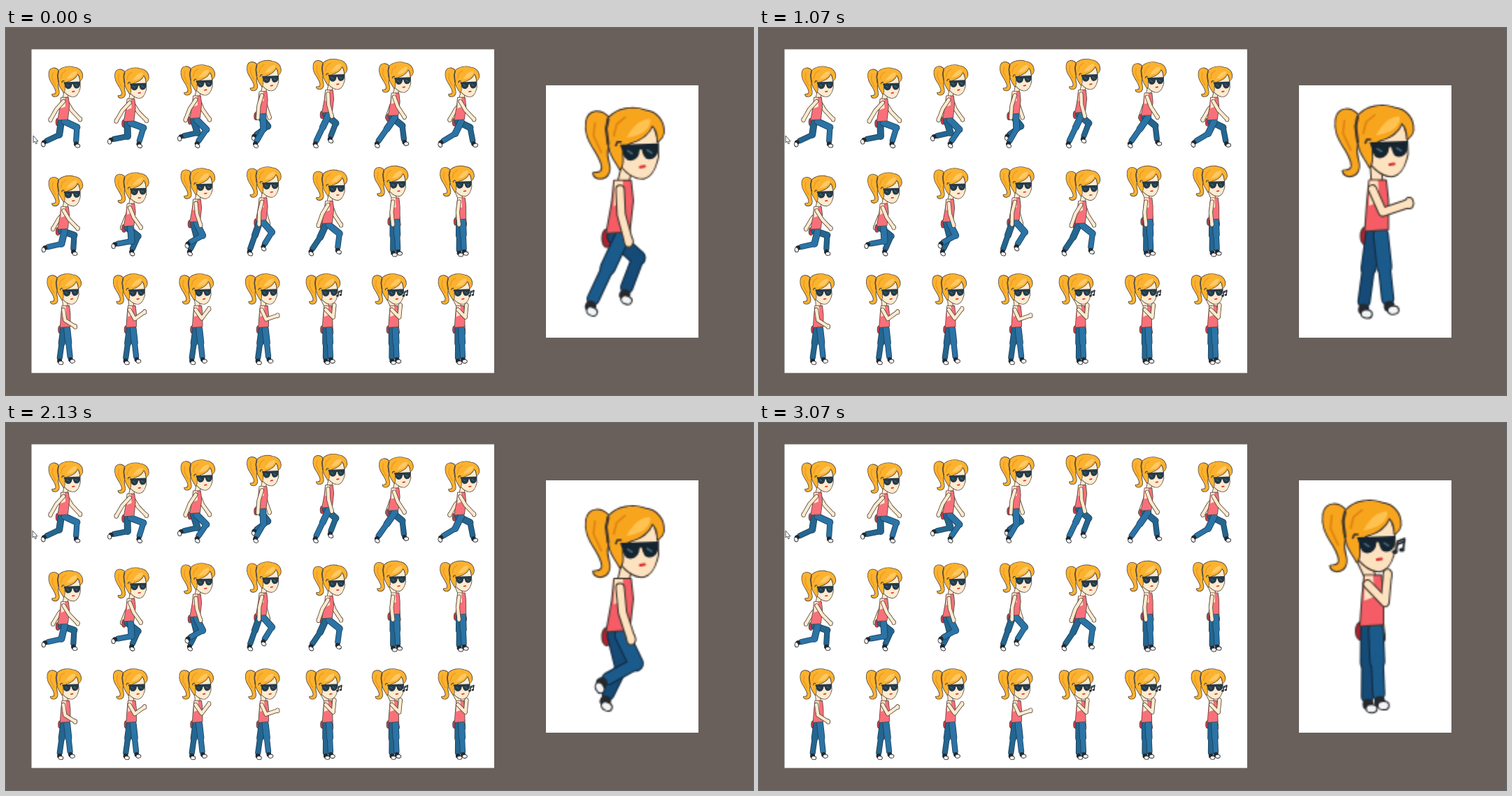
Write an HTML page with a canvas that moves like this. It is 1068x525 px and loops after 3140 ms.

```html
<!DOCTYPE html>
<html>
<head>
<meta charset="utf-8">
<title>Walking sprite</title>
<style>
  html, body { margin: 0; width: 100%; height: 100%; overflow: hidden; background: #69605b; }
  canvas { display: block; }
</style>
</head>
<body>
<canvas id="stage" width="1068" height="525"></canvas>
<script>
const LOOP = 3140, COUNT = 21, WALK_POSES = 12;
const SHEET = { x: 36.5, y: 30.5, w: 661.5, h: 463 };
const PANEL = { x: 772, y: 81.5, w: 218, h: 361.5 };
const UPPER_ARM = 36, FOREARM = 40, LEG_BONE = 45;

const SMALL = { hair: '#fbb22e', shade: '#ee9722', shine: '#ffc865', jeans: '#2b74a6', far: '#24668f',
  top: '#f8707a', jacket: '#c63c4c', skin: '#ffebcf', line: '#5a4c42', seam: '#1d4260', lens: '#263a48' };
const LARGE = { hair: '#f8a51e', shade: '#e08410', shine: '#ffc250', jeans: '#1b5b8b', far: '#154b76',
  top: '#f55c66', jacket: '#b3202f', skin: '#fde2c0', line: '#44372d', seam: '#132c44', lens: '#16242f' };

// Standing groups and the forearm angle of each standing pose (0 hangs down, PI points up).
const IDLE = { headX: 38, x: 109, farArm: 8, feet: [-7, 9] };
const GESTURE = { headX: 50, x: 112, farArm: -3, feet: [-19, 15] };
const MUSIC = { headX: 32, x: 105, farArm: 8, feet: [-7, 9] };
const FOREARMS = [0.1, 0.1, 1, 2.2, 2.5, 1.9, 3.05, 3.05, 3.05];

const PONYTAIL = new Path2D('M35 15C24 2 6 3 3 20C0 40 10 52 17 64C24 76 28 86 24 91C20 95 16 93 13 94C15 104 30 103 34 94C40 84 29 74 33 58C36 44 37 28 35 15Z');
const FACE = new Path2D('M46 50L53 84C62 95 74 102 85 101C96 98 100 88 103 78L105 70L104 46L96 20L60 40Z');
const HAIR = new Path2D('M34 16C46 1 70-2 86 4C104 6 114 20 113 36C112 42 109 45 105 48C105 38 103 30 97 25C92 38 80 46 66 50C58 54 53 61 54 70C55 78 54 83 51 88C46 78 38 70 36 58C32 44 32 30 34 16Z');
const SHINE = new Path2D('M60 43C70 26 80 16 94 16C96 28 84 40 60 43Z');
const GLASSES = new Path2D('M51 53L106 51L105 64Q102 74 92 74Q84 73 82 60L79 60Q78 75 66 76Q56 75 54 62Z');

const ctx = document.getElementById('stage').getContext('2d');
const soft = document.createElement('canvas');
soft.width = 109;
soft.height = 181;
const softCtx = soft.getContext('2d');

// Ankle path of one leg: back along the ground, then lifted forward.
function stride(phase) {
  const s = Math.sin(phase);
  return [99 + 48 * Math.cos(phase) - 10 * s * s, 306 - (s < 0 ? 22 * s * s : 0)];
}

function walkPose(index) {
  const phase = index / WALK_POSES * 2 * Math.PI;
  const bob = 15 * Math.cos(2 * phase - 0.84);
  const swing = -0.66 * Math.cos(phase - 0.3);
  const arm = (offset, angle) => ({ offset, upper: angle - 0.1, fore: angle + 0.12 });
  return {
    head: [55, 47 + bob], chest: [109, 152 + bob], hip: [104, 222 + bob],
    near: arm(-3, swing), far: arm(6, -swing),
    ankles: [stride(phase + Math.PI), stride(phase)]
  };
}

function standPose(index) {
  const group = index < 14 ? IDLE : index < 18 ? GESTURE : MUSIC;
  const { x, headX, farArm, feet } = group;
  const fore = FOREARMS[index - WALK_POSES];
  return {
    head: [headX, 29], chest: [x, 137], hip: [x, 204],
    near: { offset: -7, upper: fore * 0.3 - 0.15, fore },
    far: { offset: farArm, upper: 0, fore: 0.1 },
    ankles: [[x + feet[0], 310], [x + feet[1], 306]],
    note: group === MUSIC
  };
}

// Two equal bones, the joint bending forward.
function kneeBetween(hx, hy, ax, ay) {
  const dx = ax - hx, dy = ay - hy, d = Math.hypot(dx, dy);
  const bend = Math.sqrt(Math.max(0, LEG_BONE ** 2 - d * d / 4));
  return [(hx + ax) / 2 + dy / d * bend, (hy + ay) / 2 - dx / d * bend];
}

function drawGirl(g, index, c) {
  const pose = index < WALK_POSES ? walkPose(index) : standPose(index);
  const [sx, sy] = pose.chest, [hx, hy] = pose.hip, [headX, headY] = pose.head;
  g.lineCap = g.lineJoin = 'round';

  const line = (color, width, ...p) => {
    g.beginPath();
    for (let i = 0; i < p.length; i += 2) g.lineTo(p[i], p[i + 1]);
    g.strokeStyle = color;
    g.lineWidth = width;
    g.stroke();
  };
  const shape = (path, fill, stroke) => {
    if (stroke) {
      g.strokeStyle = stroke;
      g.lineWidth = 4;
      g.stroke(path);
    }
    g.fillStyle = fill;
    g.fill(path);
  };
  const oval = (x, y, rx, ry, fill, stroke) => {
    const path = new Path2D();
    path.ellipse(x, y, rx, ry, 0, 0, 7);
    shape(path, fill, stroke);
  };
  const poly = (...p) => new Path2D('M' + p.join(' ') + 'Z');

  const drawArm = ({ offset, upper, fore }) => {
    const x = sx + offset, y = sy + 12;
    const ex = x + UPPER_ARM * Math.sin(upper), ey = y + UPPER_ARM * Math.cos(upper);
    const px = ex + FOREARM * Math.sin(fore), py = ey + FOREARM * Math.cos(fore);
    oval(px, py, 5, 7, c.skin, c.line);
    line(c.line, 14, x, y, ex, ey, px, py);
    line(c.skin, 10, x, y, ex, ey, px, py);
    oval(px, py, 5, 7, c.skin);
  };
  const drawLeg = (x, y, [ax, ay], color) => {
    const [kx, ky] = kneeBetween(x, y, ax, ay);
    line(c.seam, 23, x, y, kx, ky);
    line(c.seam, 19, kx, ky, ax, ay);
    line(color, 19, x, y, kx, ky);
    line(color, 15, kx, ky, ax, ay);
    g.save();
    g.translate(ax, ay);
    g.rotate(Math.atan2(ay - ky, ax - kx) - Math.PI / 2);
    oval(1, 11, 8, 8, '#26292e');
    oval(6, 17, 7, 5, '#f4f4f4', '#26292e');
    g.restore();
  };

  drawArm(pose.far);
  oval(hx - 17, hy + 12, 6, 12, c.jacket, c.line);
  drawLeg(hx - 6, hy + 10, pose.ankles[0], c.far);
  drawLeg(hx + 5, hy + 10, pose.ankles[1], c.jeans);

  line(c.line, 18, headX + 60, headY + 88, sx, sy + 8);
  line(c.skin, 14, headX + 60, headY + 88, sx, sy + 8);
  shape(poly(sx - 11, sy, sx + 12, sy, sx + 15, sy + 28, hx + 15, hy + 2, hx - 17, hy + 4, sx - 14, sy + 30), c.top, c.line);
  shape(poly(sx - 11, sy, sx + 1, sy, sx + 3, sy + 30, sx - 12, sy + 36), c.skin);

  g.save();
  g.translate(headX, headY);
  shape(PONYTAIL, c.hair, c.line);
  shape(FACE, c.skin, c.line);
  shape(HAIR, c.hair, c.line);
  shape(SHINE, c.shine);
  line(c.shade, 3, 15, 22, 13, 40, 24, 64);
  line(c.shade, 3, 42, 40, 46, 24, 58, 14);
  line(c.line, 4, 34, 17, 31, 30, 34, 52);
  line(c.line, 3, 45, 54, 47, 49, 52, 49);
  shape(GLASSES, c.lens);
  line('#3d6676', 3, 62, 62, 68, 66);
  line('#3d6676', 3, 90, 61, 96, 65);
  line('#d93434', 4, 80, 85, 86, 84);
  g.restore();

  drawArm(pose.near);

  if (pose.note) {
    const ink = '#252b30';
    line(ink, 3, 139, 103, 141, 88, 151, 84, 149, 100);
    line(ink, 3, 141, 92, 151, 88);
    oval(137, 103, 4, 3, ink);
    oval(147, 100, 4, 3, ink);
  }
}

function drawSheet() {
  ctx.fillStyle = '#69605b';
  ctx.fillRect(0, 0, 1068, 525);
  ctx.fillStyle = '#fff';
  ctx.fillRect(SHEET.x, SHEET.y, SHEET.w, SHEET.h);
  const w = SHEET.w / 7, h = SHEET.h / 3;
  for (let i = 0; i < COUNT; i++) {
    ctx.save();
    ctx.translate(SHEET.x + (i % 7) * w, SHEET.y + Math.floor(i / 7) * h);
    ctx.scale(w / PANEL.w, h / PANEL.h);
    drawGirl(ctx, i, SMALL);
    ctx.restore();
  }
}

function drawCursor(x, y) {
  ctx.fillStyle = '#fff';
  ctx.fillRect(37, y - 2, 9, 16);
  ctx.strokeStyle = '#555';
  ctx.lineWidth = 1;
  ctx.stroke(new Path2D(`M${x} ${y}v10l2-2 2 4 1.5-1-1.5-3h3Z`));
}

// The figure is drawn at half size and enlarged, which softens its edges.
function drawPanel(index) {
  softCtx.setTransform(1, 0, 0, 1, 0, 0);
  softCtx.fillStyle = '#fff';
  softCtx.fillRect(0, 0, soft.width, soft.height);
  softCtx.scale(soft.width / PANEL.w, soft.height / PANEL.h);
  drawGirl(softCtx, index, LARGE);
  ctx.drawImage(soft, PANEL.x, PANEL.y, PANEL.w, PANEL.h);
}

// Poses run at 12 per second, shown on a screen refreshed 15 times per second.
function poseAt(t) {
  const tick = Math.min(46, Math.floor((t + 5) * 15 / 1000));
  return (4 + Math.floor(tick * 12 / 15 + 0.99)) % COUNT;
}

const origin = performance.now();

function render() {
  const t = (performance.now() - origin) % LOOP;
  drawPanel(poseAt(t));
  drawCursor(t < 70 ? 39 : 38, 154);
  requestAnimationFrame(render);
}

drawSheet();
render();
</script>
</body>
</html>
```
